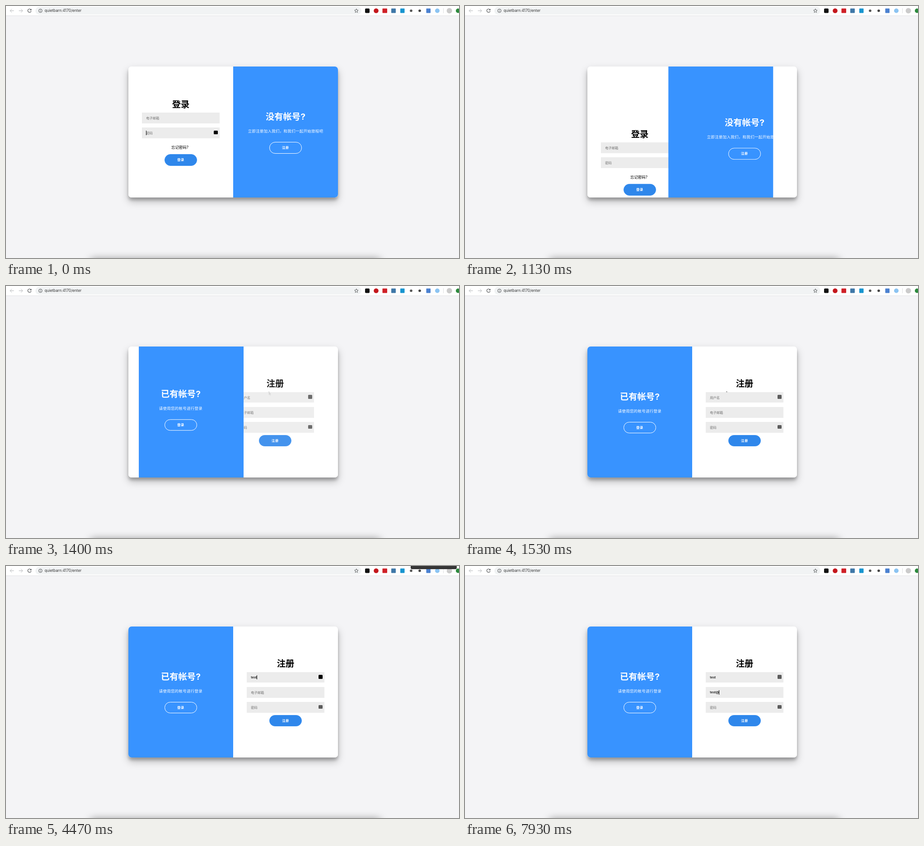
An HTML page that plays this animation: 1003 px wide and 558 px high, repeating every 8 s.

```html
<!DOCTYPE html>
<html lang="zh-CN">
<head>
<meta charset="utf-8">
<title>登录</title>
<style>
  html, body { margin: 0; width: 100%; height: 100%; overflow: hidden; }
  body {
    position: relative; background: #f4f4f6; color: #000;
    font-family: Inter, "Noto Sans CJK SC", "Noto Sans CJK JP", sans-serif;
  }
  body * { box-sizing: border-box; }

  /* Browser bar */
  .bar { position: absolute; inset: 0 0 auto; height: 22px; background: #fff; border-bottom: 1px solid #e3e3e5; }
  .bar svg { position: absolute; left: 0; top: 0; }
  .url { position: absolute; left: 85.5px; top: 0; font-size: 8.3px; line-height: 21px; color: #333; white-space: nowrap; }
  .note {
    position: absolute; left: 896px; top: 0; width: 102px; height: 7px;
    background: #353535; border-radius: 0 0 3px 3px; transform: translateY(-9px);
    animation: note 8s infinite;
  }
  .dock { position: absolute; left: 190px; top: 562px; width: 636px; height: 30px; box-shadow: 0 0 18px 2px rgba(0,0,0,.4); }

  /* Card */
  .card, .shade { position: absolute; left: 271px; top: 134px; width: 464px; height: 290px; border-radius: 7px; }
  .shade { box-shadow: 0 8.5px 17px rgba(0,0,0,.25), 0 6px 6px rgba(0,0,0,.22); }
  .card { overflow: hidden; background: #fff; }
  .half { position: absolute; left: 0; top: 0; width: 232px; height: 290px; }
  .half > * { position: absolute; margin: 0; }
  h1, p { left: 0; width: 232px; text-align: center; line-height: 24px; white-space: nowrap; }
  h1 { font-size: 19.3px; font-weight: 700; }
  p { font-size: 8.46px; font-weight: 500; letter-spacing: .3px; }
  p.forgot { font-weight: 400; letter-spacing: 0; left: -2px; }
  .button {
    left: 80.2px; width: 71.6px; height: 25.8px; border-radius: 13px; border: .8px solid #fff;
    color: #fff; font-size: 7.25px; font-weight: 700; letter-spacing: .6px;
    line-height: 24.4px; text-align: center;
  }
  .button.solid { background: #2f87eb; border-color: #3a90f2; }
  .field {
    left: 30.3px; width: 171.4px; height: 23.7px; padding-left: 9px;
    display: flex; align-items: center; background: #ececec; font-size: 7.25px; white-space: nowrap;
  }
  .field b { font-weight: 500; }
  .field i { width: .8px; height: 9.6px; margin-right: -.8px; background: #000; visibility: hidden; }
  .field span { color: #6f6f6f; }
  .field.key::after {
    content: ""; position: absolute; left: 158.6px; top: 6.5px; width: 9px; height: 8.6px;
    border-radius: 1.5px; background: #5c5c5c;
  }
  .field.key.focus::after { background: #000; }

  /* Panel swap */
  .login { background: #fff; z-index: 2; animation: drop 8s infinite; }
  .register { z-index: 1; animation: reveal 8s infinite; }
  .window { position: absolute; z-index: 3; left: 232px; top: 0; width: 232px; height: 290px; overflow: hidden; background: #3893ff; animation: left 8s infinite; }
  .plane { position: absolute; left: -232px; top: 0; width: 464px; height: 290px; color: #fff; animation: right 8s infinite; }
  .plane .from { animation: rise 8s infinite; }
  .plane .to { left: 232px; animation: sink 8s infinite; }
  .press { animation: press 8s infinite; }

  /* The swap runs from 933 ms to 1533 ms */
  @keyframes drop {
    0%, 11.6625% { transform: none; animation-timing-function: ease-in-out; }
    19.1625%, 100% { transform: translateY(290px); }
  }
  @keyframes reveal {
    0%, 11.6625% { transform: none; opacity: 0; animation-timing-function: ease-in-out; }
    19.1625%, 100% { transform: translateX(232px); opacity: 1; }
  }
  @keyframes left {
    0%, 11.6625% { transform: none; animation-timing-function: ease-in-out; }
    19.1625%, 100% { transform: translateX(-232px); }
  }
  @keyframes right {
    0%, 11.6625% { transform: none; animation-timing-function: ease-in-out; }
    19.1625%, 100% { transform: translateX(232px); }
  }
  @keyframes rise {
    0%, 11.6625% { transform: translateY(-58px); animation-timing-function: ease-in-out; }
    19.1625%, 100% { transform: none; }
  }
  @keyframes sink {
    0%, 11.6625% { transform: none; animation-timing-function: ease-in-out; }
    19.1625%, 100% { transform: translateY(58px); }
  }
  @keyframes press {
    0%, 10% { transform: none; animation-timing-function: ease-in; }
    11%, 11.6625% { transform: scale(.95); animation-timing-function: ease-in; }
    12.6625%, 100% { transform: none; }
  }
  @keyframes note {
    0%, 34.5% { transform: translateY(-9px); animation-timing-function: ease-out; }
    38%, 62% { transform: none; animation-timing-function: ease-in; }
    65.5%, 100% { transform: translateY(-9px); }
  }

  /* Pointer */
  .pointer { position: absolute; left: 0; top: 0; animation: pointer 8s infinite; }
  .pointer svg { position: absolute; left: -10px; top: -10px; }
  .pointer g { visibility: hidden; }
  .pointer[data-kind=arrow] .arrow, .pointer[data-kind=hand] .hand, .pointer[data-kind=beam] .beam { visibility: visible; }
  @keyframes pointer {
    0%, 1.5% { transform: translate(628.7px, 318.3px); }
    6%, 12.5% { transform: translate(630px, 322.7px); animation-timing-function: ease-in-out; }
    15.875% { transform: translate(588.3px, 235.8px); animation-timing-function: ease-out; }
    19.125% { transform: translate(578.5px, 232.4px); animation-timing-function: ease-in-out; }
    21.6%, 100% { transform: translate(574px, 246px); }
  }
</style>
</head>
<body>
<div class="bar">
  <svg width="1003" height="21" fill="none" stroke-width="1">
    <rect x="65" y="2" width="722" height="17" rx="8.5" fill="#f1f3f4"/>
    <g stroke="#b4b6b9">
      <path d="M17.5 10.5H9.5M13 6.5l-4 4 4 4"/>
      <path d="M28.5 10.5h8M33 6.5l4 4-4 4"/>
    </g>
    <g stroke="#4b4d50">
      <path d="M55 7.8a3.8 3.8 0 1 0 .8 3.5" stroke-width="1.2"/>
      <path d="M56.3 6v3.5h-3.5z" fill="#4b4d50" stroke="none"/>
      <circle cx="76.2" cy="10.5" r="3.8"/>
      <path d="M76.2 10v2.6M76.2 8v1"/>
      <path d="M775.8 6.2l1.2 2.8 3 .3-2.3 2 .7 3-2.6-1.6-2.6 1.6.7-3-2.3-2 3-.3z" stroke-width=".9"/>
    </g>
    <rect x="795" y="5.5" width="10" height="10" rx="2" fill="#111"/>
    <circle cx="819.5" cy="10.5" r="5.3" fill="#c4161c"/>
    <rect x="833.5" y="5.5" width="10.5" height="10" rx="1" fill="#cf2027"/>
    <rect x="853" y="5.5" width="10" height="10" rx="1" fill="#3f78a8"/>
    <rect x="873" y="5.5" width="9.5" height="10" rx="1" fill="#1794cf"/>
    <circle cx="897" cy="10.5" r="2.8" fill="#555"/>
    <circle cx="916" cy="10.5" r="2.8" fill="#444"/>
    <rect x="930.5" y="5.5" width="9.5" height="10" rx="1" fill="#4a80d0"/>
    <circle cx="955" cy="10.5" r="5" fill="#8cc4f2"/>
    <path d="M968.5 5v11" stroke="#dcdde0"/>
    <circle cx="981.7" cy="10.5" r="6" fill="#cbcbcb"/>
    <circle cx="1001" cy="10.5" r="5" fill="#2b8a3c"/>
  </svg>
  <div class="url">quietbarn:4170/enter</div>
</div>
<div class="note"></div>
<div class="dock"></div>

<div class="shade"></div>
<div class="card">
  <div class="half login">
    <h1 style="top:71.5px">登录</h1>
    <div class="field" style="top:102px"><span>电子邮箱</span></div>
    <div class="field key" id="secret" style="top:135.3px"><b></b><i></i><span>密码</span></div>
    <p class="forgot" style="top:166.7px">忘记密码?</p>
    <div class="button solid" style="top:194px">登录</div>
  </div>
  <div class="half register">
    <h1 style="top:70.3px">注册</h1>
    <div class="field key" id="user" style="top:100.7px"><b></b><i></i><span>用户名</span></div>
    <div class="field" id="mail" style="top:134px"><b></b><i></i><span>电子邮箱</span></div>
    <div class="field key" style="top:167.3px"><span>密码</span></div>
    <div class="button solid" style="top:195.7px">注册</div>
  </div>
  <div class="window">
    <div class="plane">
      <div class="half from">
        <h1 style="top:99px">已有帐号?</h1>
        <p style="top:130.5px">请使用您的帐号进行登录</p>
        <div class="button" style="top:166.7px">登录</div>
      </div>
      <div class="half to">
        <h1 style="top:99px">没有帐号?</h1>
        <p style="top:130.5px">立即注册加入我们，和我们一起开始旅程吧</p>
        <div class="button press" style="top:166.7px">注册</div>
      </div>
    </div>
  </div>
</div>

<div class="pointer" data-kind="arrow">
  <svg width="30" height="30" viewBox="-10 -10 30 30">
    <g class="arrow">
      <path d="M0 0v8.6l2-1.8 1.3 3 1.5-.7-1.3-2.9h2.7z" fill="#000" stroke="#fff" stroke-width=".7"/>
    </g>
    <g class="hand">
      <path d="M-1 1q0-1 .8-1t.8 1v3l3 .7q1 .3.9 1.3l-.5 2.8-.8 1.2H-.2l-2.6-3.6q-.3-.9.5-1L-1 6.3z" fill="#fff" stroke="#000" stroke-width=".8"/>
    </g>
    <g class="beam">
      <path d="M-2.2-4.7q2.2 0 2.2 1.2 0-1.2 2.2-1.2M0-3.5v7M-2.2 4.7Q0 4.7 0 3.5q0 1.2 2.2 1.2M-1 1.3h2" fill="none" stroke="#222" stroke-width=".8"/>
    </g>
  </svg>
</div>

<script>
  const LOOP = 8000;

  // [time, focused field, its text]
  const edits = [
    [0, 'secret', ''], [800, '', ''], [2130, 'user', ''],
    [3730, 'user', 't'], [4000, 'user', 'te'], [4270, 'user', 'tes'], [4400, 'user', 'test'],
    [5330, 'user', 'test@'], [6470, 'user', 'test'],
    [6900, 'mail', ''], [7200, 'mail', 't'], [7300, 'mail', 'te'], [7400, 'mail', 'tes'],
    [7530, 'mail', 'test'], [7800, 'mail', 'test@'],
  ];
  const pointerKinds = [
    [0, 'arrow'], [130, 'hand'], [1070, 'arrow'], [1200, 'beam'],
    [1400, 'arrow'], [1600, 'beam'], [3670, 'none'],
  ];

  const pointer = document.querySelector('.pointer');
  const fields = ['secret', 'user', 'mail'].map(id => document.getElementById(id));
  const until = (rows, t) => rows.filter(row => row[0] <= t);

  function render(t) {
    const done = until(edits, t);
    const [since, focus] = done.at(-1);
    const caretOn = (t - since) % 1000 < 500;
    const texts = Object.fromEntries(done.map(([, id, text]) => [id, text]));

    for (const field of fields) {
      const [value, caret, hint] = field.children;
      const active = field.id === focus;
      value.textContent = texts[field.id] || '';
      hint.style.display = value.textContent ? 'none' : '';
      caret.style.visibility = active && caretOn ? 'inherit' : 'hidden';
      if (active && caretOn) caret.style.visibility = 'visible';
      field.classList.toggle('focus', active);
    }
    pointer.dataset.kind = until(pointerKinds, t).at(-1)[1];
  }

  let start;
  function tick() {
    const now = performance.now();
    start ??= now;
    render((now - start) % LOOP);
    requestAnimationFrame(tick);
  }
  render(0);
  requestAnimationFrame(tick);
</script>
</body>
</html>
```
